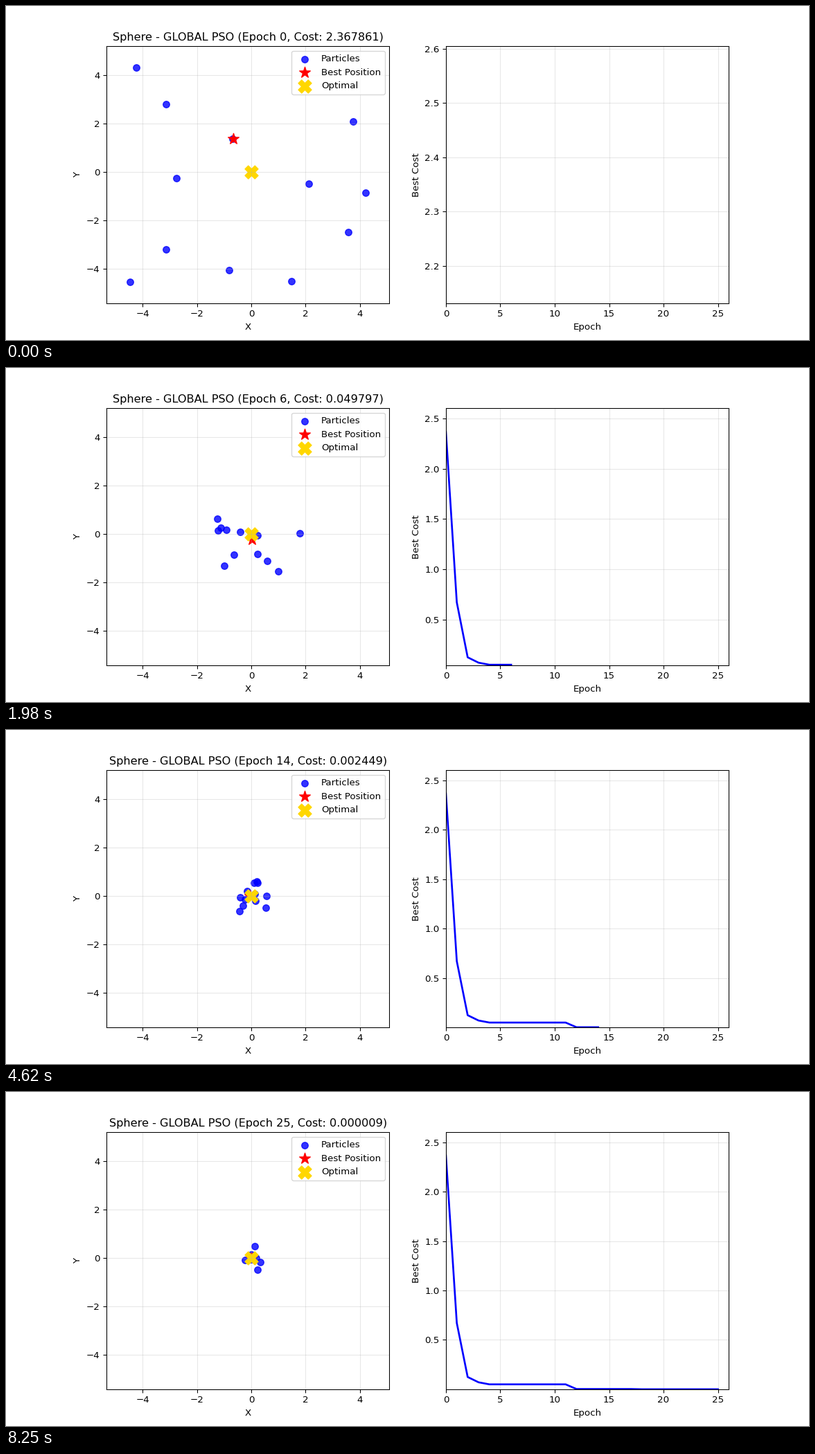
A matplotlib script that plays this animation: 1159 by 483 pixels, repeating every 8.58 s.

```python
import matplotlib.pyplot as plt
import numpy as np
from matplotlib.animation import FuncAnimation

EPOCHS = 26
STEP_MS = 330

# Random start of the swarm
START = np.array([
    (-4.24, 4.31), (-3.14, 2.79), (-0.68, 1.38), (-2.76, -0.26),
    (-3.14, -3.20), (-4.47, -4.53), (-0.83, -4.04), (1.48, -4.50),
    (3.57, -2.49), (4.215, -0.86), (2.12, -0.48), (3.76, 2.09)])

# Epoch of each improvement: (cost, direction from the optimum in degrees)
IMPROVEMENTS = {
    0: (2.367861, 116), 1: (0.671532, 128), 2: (0.124146, 227),
    3: (0.070518, 240), 4: (0.049797, 273), 12: (0.002449, 172),
    18: (0.000009, 45)}


def build_bests():
    """Best cost and best position per epoch; the cost is x² + y²."""
    rows = []
    for epoch in range(EPOCHS):
        rows.append(IMPROVEMENTS.get(epoch) or rows[-1])
    costs, degrees = np.array(rows).T
    angle = np.radians(degrees)
    unit = np.column_stack([np.cos(angle), np.sin(angle)])
    return costs, np.sqrt(costs)[:, None] * unit


def build_swarm(costs, bests, seed=7):
    """Particles wander around the optimum while their reach fades."""
    rng = np.random.default_rng(seed)
    pace = np.linspace(12, 24, len(START))[:, None]
    wander = rng.normal(size=START.shape)
    swarm = [START]
    for epoch in range(1, EPOCHS):
        wander = 0.5 * wander + 0.85 * rng.normal(size=START.shape)
        reach = 0.95 * np.exp(-(epoch / pace) ** 2)
        memory = 0.3 ** epoch
        points = memory * START + (1 - memory) * reach * wander

        # No particle may beat the best cost; its finder stands on it
        radius = np.hypot(*points.T)[:, None]
        points *= np.maximum(1, np.sqrt(costs[epoch]) / radius)
        if epoch in IMPROVEMENTS:
            gap = np.hypot(*(points - bests[epoch]).T)
            points[gap.argmin()] = bests[epoch]
        swarm.append(points)
    return swarm


costs, bests = build_bests()
swarm = build_swarm(costs, bests)

low, high = START.min(axis=0), START.max(axis=0)
margin = 0.1 * (high - low)
x_lim, y_lim = zip(low - margin, high + margin)

fig, (space, chart) = plt.subplots(1, 2, figsize=(12, 5), dpi=96.6)

particles = space.scatter(*START.T, c="blue", s=50, alpha=0.8,
                          label="Particles")
star = space.scatter(*bests[0], c="red", s=150, marker="*",
                     label="Best Position")
space.scatter(0, 0, c="gold", s=200, marker="X", label="Optimal")
space.set(xlim=x_lim, ylim=y_lim, xlabel="X", ylabel="Y")
space.grid(True, alpha=0.3)
space.legend(loc="upper right")
title = space.set_title("")

curve, = chart.plot([], [], color="blue", linewidth=2)
chart.set(xlim=(0, EPOCHS), xlabel="Epoch", ylabel="Best Cost")
chart.grid(True, alpha=0.3)


def draw(epoch):
    particles.set_offsets(swarm[epoch])
    star.set_offsets(bests[epoch])
    title.set_text(f"Sphere - GLOBAL PSO (Epoch {epoch}, "
                   f"Cost: {costs[epoch]:.6f})")
    curve.set_data(np.arange(epoch + 1), costs[:epoch + 1])
    chart.set_ylim(costs[epoch] * 0.9, costs[0] * 1.1)
    return particles, star, title, curve


anim = FuncAnimation(fig, draw, frames=EPOCHS, interval=STEP_MS,
                     init_func=lambda: draw(0), repeat=True, repeat_delay=0)
plt.show()
```
